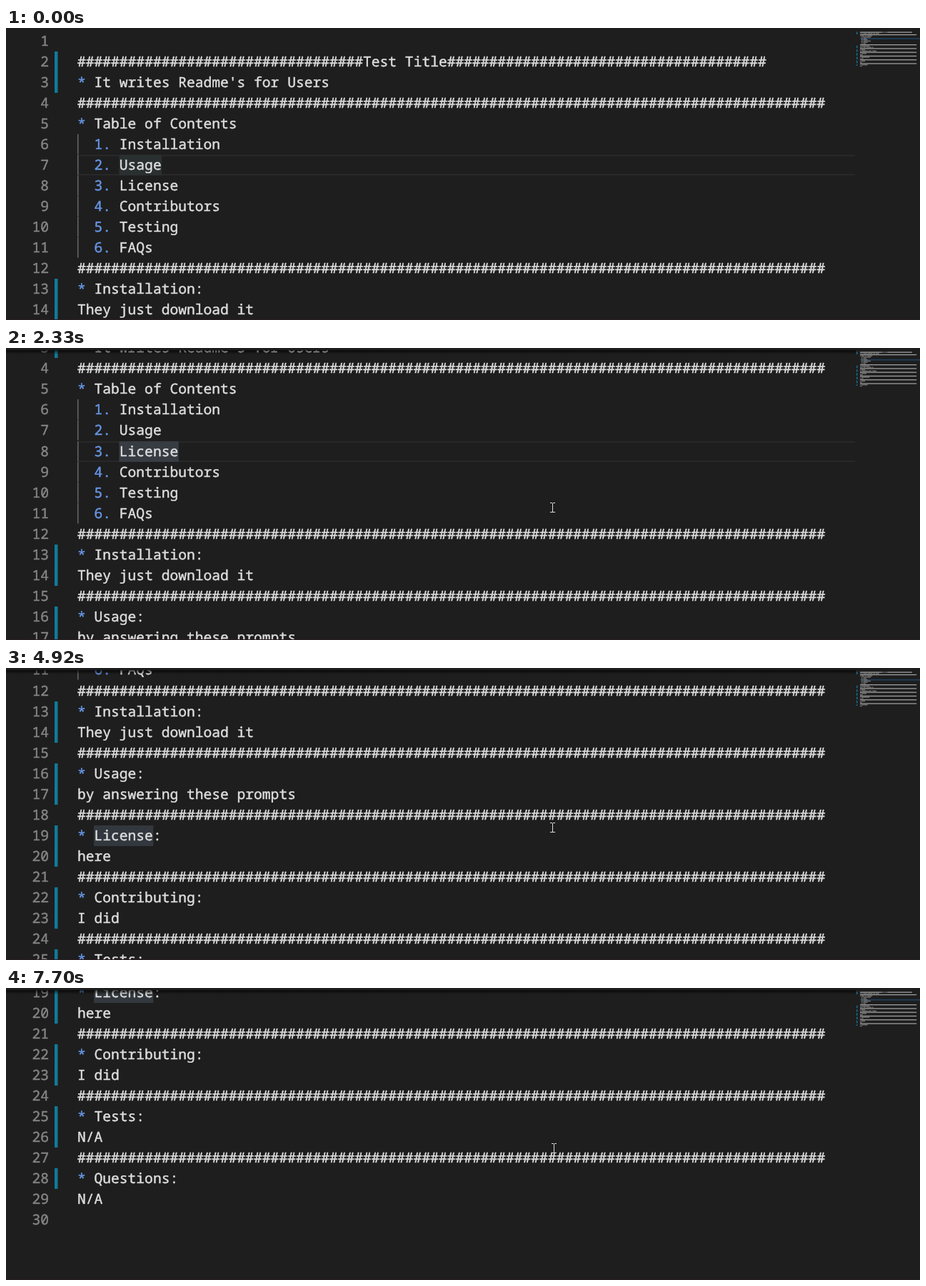
These frames come from a looping animation (1280 by 410 pixels, 8000 ms). An HTML page with a canvas:

```html
<!DOCTYPE html>
<html lang="en">
<head>
<meta charset="utf-8">
<title>Readme scroll</title>
<style>
  html, body { margin: 0; height: 100%; overflow: hidden; background: #1e1e1e; }
  canvas { display: block; }
</style>
</head>
<body>
<canvas id="stage" width="1280" height="410"></canvas>
<script>
const ctx = document.getElementById('stage').getContext('2d');
const LOOP = 8000, ROW = 29.06, CHAR = 11.765, LEFT = 100, NOTCH = 76.4;
const hash = n => '#'.repeat(n);
const RULE = hash(89);
const LINES = [
  '', hash(34) + 'Test Title' + hash(38), "* It writes Readme's for Users", RULE,
  '* Table of Contents', '  1. Installation', '  2. Usage', '  3. License',
  '  4. Contributors', '  5. Testing', '  6. FAQs', RULE,
  '* Installation:', 'They just download it', RULE,
  '* Usage:', 'by answering these prompts', RULE,
  '* License:', 'here', RULE,
  '* Contributing:', 'I did', RULE,
  '* Tests:', 'N/A', RULE,
  '* Questions:', 'N/A', ''
];
const CHANGED = [2, 3, 13, 14, 16, 17, 19, 20, 22, 23, 25, 26, 28];
const CLICK = 810, WORD_MARK = 1080;
const SCROLLS = [2330, 3170, 4100, 4920, 5580, 6370, 6830];
const BLINKS = [CLICK, 1310, 1820, 2330, 2790, 3300, 3820, 4280, 4790];

const passed = (times, t) => times.filter(x => x <= t).length;

function rect(color, x, y, w, h) {
  ctx.fillStyle = color;
  ctx.fillRect(x, y, w, h);
}

// A thin stroke thickens the strokes of the regular weight.
function text(str, col, y, color) {
  ctx.fillStyle = ctx.strokeStyle = color;
  ctx.fillText(str, LEFT + col * CHAR, y);
  ctx.strokeText(str, LEFT + col * CHAR, y);
}

function drawEditor(t) {
  const scroll = passed(SCROLLS, t) * NOTCH;
  const top = n => Math.round(3.5 + (n - 1) * ROW - scroll);
  const clicked = t >= CLICK;
  const current = clicked ? 8 : 7;
  const mark = (n, col, len, color) =>
    rect(color, LEFT + col * CHAR - 0.5, top(n), len * CHAR + 1, 29);

  ctx.save();
  ctx.beginPath();
  ctx.rect(0, 3, 1190, 406);
  ctx.clip();

  rect('#282828', 102, top(current), 1087, 2);
  rect('#282828', 102, top(current) + 27, 1087, 2);
  if (!clicked) mark(7, 5, 5, '#2a2f30');
  if (t >= WORD_MARK) {
    mark(8, 5, 7, '#373c42');
    mark(19, 2, 7, '#32383d');
  }

  LINES.forEach((line, i) => {
    const n = i + 1, y = top(n), base = y + 21;
    if (y < -30 || y > 410) return;
    if (CHANGED.includes(n)) rect('#117a98', 68, y, 4.5, top(n + 1) - y);
    if (n >= 6 && n <= 11) rect('#676767', 100, y, 1.5, 28.5);
    ctx.textAlign = 'right';
    text(n, -40 / CHAR, base, '#858585');
    ctx.textAlign = 'left';
    const bullet = line.match(/^(\*|  \d\.)/);
    const len = bullet ? bullet[0].length : 0;
    text(line.slice(0, len), 0, base, '#6796e6');
    text(line.slice(len), len, base, '#dedede');
  });

  if (passed(BLINKS, t) % 2) rect('#d0d0d0', 241, top(8), 2, 29);

  if (scroll) {
    const shade = ctx.createLinearGradient(0, 3, 0, 9);
    shade.addColorStop(0, 'rgba(0,0,0,.7)');
    shade.addColorStop(1, 'rgba(0,0,0,0)');
    rect(shade, 0, 3, 1190, 6);
  }
  ctx.restore();
  rect('#2c1c24', 0, 409, 1280, 1);
}

function drawMinimap(current) {
  const y = n => 5.4 + (n - 2) * 1.76;
  rect('#1f4568', 1196, y(current), 84, 1.4);
  LINES.forEach((line, i) => {
    for (const word of line.matchAll(/#+|[^\s#]+/g)) {
      const color = word[0][0] === '#' ? '#a6a6a6' : '#7c7c7c';
      rect(color, 1196 + word.index * 0.89, y(i + 1), word[0].length * 0.89, 1.2);
    }
  });
  CHANGED.forEach(n => rect('#117a98', 1191, y(n), 1.5, 1.7));
}

function pointerAt(t) {
  if (t < CLICK) {
    const left = (1 - (t - 340) / (CLICK - 340)) ** 2;
    return [765 + 75 * left, 222 + 190 * left];
  }
  return [
    765 + passed([7470, 7650], t),
    222 + passed([1920, 2330, 7700], t)
  ];
}

function drawPointer(t) {
  if (t < 340) return;
  const [x, y] = pointerAt(t).map(Math.round);
  ctx.save();
  ctx.beginPath();
  ctx.rect(0, 3, 1280, 406);
  ctx.clip();
  rect('#1e1e1e', x - 1, y - 6, 3, 13);
  rect('#dcdcdc', x, y - 6, 1, 13);
  for (const end of [y - 7, y + 6]) {
    rect('#dcdcdc', x - 3, end, 3, 1);
    rect('#dcdcdc', x + 1, end, 3, 1);
  }
  ctx.restore();
}

function frame() {
  const t = performance.now() % LOOP;
  rect('#1e1e1e', 0, 0, 1280, 410);
  ctx.font = '19.61px "Noto Sans Mono", monospace';
  ctx.textRendering = 'geometricPrecision';
  ctx.lineWidth = 0.45;
  ctx.lineJoin = 'round';
  drawEditor(t);
  drawMinimap(t >= CLICK ? 8 : 7);
  drawPointer(t);
  requestAnimationFrame(frame);
}
frame();
</script>
</body>
</html>
```
